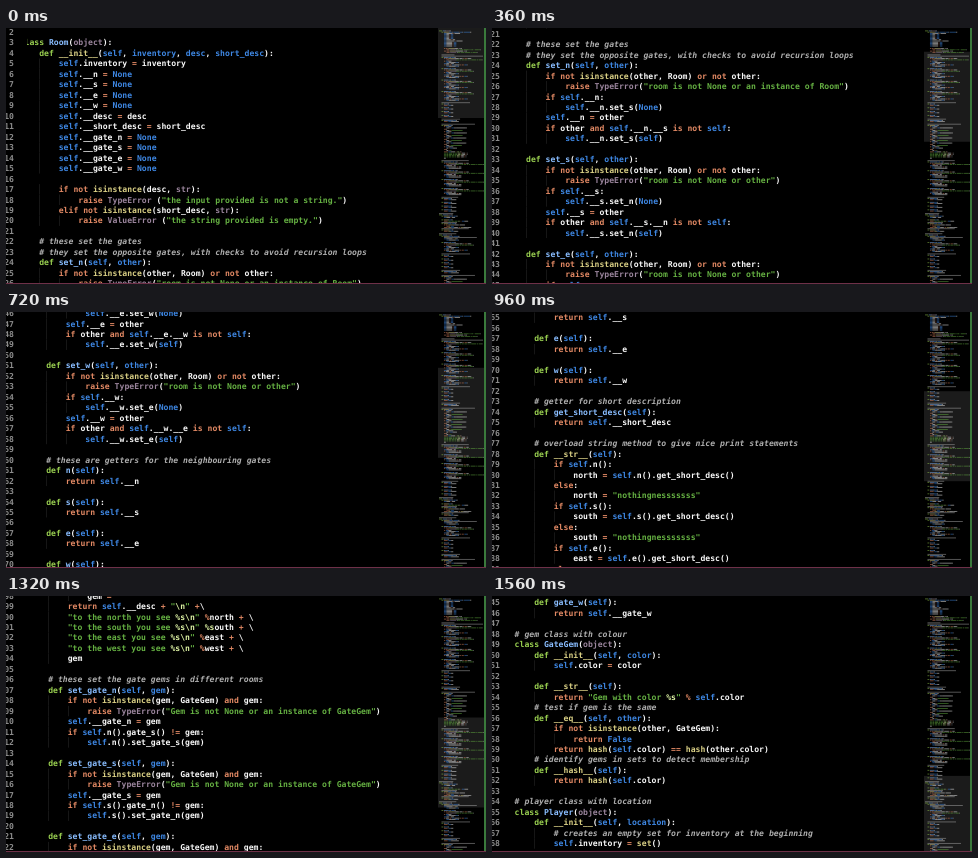
An HTML page with a canvas that plays this animation: 480x256 px, repeating every 1.68 s.

```html
<!DOCTYPE html>
<html>
<head>
<meta charset="utf-8">
<style>
  html, body { margin: 0; width: 100%; height: 100%; overflow: hidden; background: #000; }
  canvas { display: block; }
</style>
</head>
<body>
<canvas id="stage" width="480" height="256"></canvas>
<script>
const ctx = document.getElementById('stage').getContext('2d');
const STEP = 120, ROW = 10.47, COL = 4.89, GUTTER = 21;
const MAP_X = 432, MAP_ROW = 1.26, MAP_COL = 0.62, MAP_VIEW = 90;
const FACE = 'bold 8.12px "DejaVu Sans Mono", monospace';

// First visible line and left edge of the code, one entry per step.
const scroll = [1.56, 5.4, 11.27, 20.4, 30.04, 38.1, 45.84, 54.7, 64.42, 74.6, 85.6, 97.98, 119, 144.33];
const left = [13.6, 13.6, 13.6, 14.5, 15.6, 18, 20.6, 21.6, 22.6, 22.6, 22.6, 22.6, 22.6, 22.6];

const opposite = { n: 's', s: 'n', e: 'w', w: 'e' };
const names = { n: 'north', s: 'south', e: 'east', w: 'west' };
const each = make => Object.keys(opposite).map(d => make(d, opposite[d])).join('\n');

const setter = (d, o) => `    def set_${d}(self, other):
        if not isinstance(other, Room) or not other:
            raise TypeError("room is not None or ${d === 'n' ? 'an instance of Room' : 'other'}")
        if self.__${d}:
            self.__${d}.set_${o}(None)
        self.__${d} = other
        if other and self.__${d}.__${o} is not self:
            self.__${d}.set_${o}(self)
`;
const getter = prefix => d => `    def ${prefix}${d}(self):
        return self.__${prefix}${d}
`;
const describe = d => `        if self.${d}():
            ${names[d]} = self.${d}().get_short_desc()
        else:
            ${names[d]} = "nothingnesssssss"`;
const gemSetter = (d, o) => `    def set_gate_${d}(self, gem):
        if not isinstance(gem, GateGem) and gem:
            raise TypeError("Gem is not None or an instance of GateGem")
        self.__gate_${d} = gem
        if self.${d}().gate_${o}() != gem:
            self.${d}().set_gate_${o}(gem)
`;

const source = String.raw`

class Room(object):
    def __init__(self, inventory, desc, short_desc):
        self.inventory = inventory
${each(d => `        self.__${d} = None`)}
        self.__desc = desc
        self.__short_desc = short_desc
${each(d => `        self.__gate_${d} = None`)}

        if not isinstance(desc, str):
            raise TypeError ("the input provided is not a string.")
        elif not isinstance(short_desc, str):
            raise ValueError ("the string provided is empty.")

    # these set the gates
    # they set the opposite gates, with checks to avoid recursion loops
${each(setter)}
    # these are getters for the neighbouring gates
${each(getter(''))}
    # getter for short description
    def get_short_desc(self):
        return self.__short_desc

    # overload string method to give nice print statements
    def __str__(self):
${each(describe)}
        if self.gems():
            gem = self.gems()
        else:
            gem = ""
        return self.__desc + "\n" +\
${each(d => String.raw`        "to the ${names[d]} you see %s\n" %${names[d]} + ` + '\\')}
        gem

    # these set the gate gems in different rooms
${each(gemSetter)}
    # getters for the gate gems
${each(getter('gate_'))}
# gem class with colour
class GateGem(object):
    def __init__(self, color):
        self.color = color

    def __str__(self):
        return "Gem with color %s" % self.color
    # test if gem is the same
    def __eq__(self, other):
        if not isinstance(other, GateGem):
            return False
        return hash(self.color) == hash(other.color)
    # identify gems in sets to detect membership
    def __hash__(self):
        return hash(self.color)

# player class with location
class Player(object):
    def __init__(self, location):
        # creates an empty set for inventory at the beginning
        self.inventory = set()`;

const C = {
  text: '#f8f8f8', comment: '#aeaeae', string: '#65b042', escape: '#ddf2a4',
  keyword: '#e28964', storage: '#99cf50', variable: '#3e87e3', name: '#89bdff',
  builtin: '#dad085', type: '#9b859d', number: '#8c8c8c', guide: '#161616'
};
const rules = [
  [/^#/, C.comment],
  [/^(%s|\\n)$/, C.escape],
  [/^(if|elif|else|not|or|and|is|return|raise|[=!+%]=?)$/, C.keyword],
  [/^(def|class)$/, C.storage],
  [/^(self|None|False)$/, C.variable],
  [/^(isinstance|hash|set|__(init|str|eq|hash)__)$/, C.builtin],
  [/^(str|object|TypeError|ValueError)$/, C.type]
];

function tokenize(line) {
  const tokens = [];
  const isDef = /^\s*def /.test(line);
  let inString = false;
  for (const m of line.matchAll(/#.*|"|%s|\\n|\w+|[=!+%]=?|[^\s\w]|\s+/g)) {
    const text = m[0], before = line.slice(0, m.index);
    const rule = rules.find(([pattern]) => pattern.test(text));
    let color = rule ? rule[1] : C.text;
    if (text === '"') {
      inString = !inString;
      color = C.string;
    } else if (inString) {
      if (color !== C.escape) color = C.string;
    } else if (!rule && /\w/.test(text)) {
      if (/(def|class) $/.test(before)) color = C.name;
      else if (isDef) color = C.variable;
    }
    if (text.trim()) tokens.push({ text, color, col: m.index });
  }
  return tokens;
}
const lines = source.split('\n').map(tokenize);

function drawText(text, x, y) {
  [...text].forEach((ch, i) => ctx.fillText(ch, x + i * COL, y));
}

function eachVisible(first, draw) {
  for (let n = Math.max(1, Math.floor(first)); n < first + 26; n++) {
    draw(n, (n - first) * ROW + 2.4);
  }
}

function drawNumbers(first) {
  ctx.font = FACE;
  ctx.fillStyle = C.number;
  eachVisible(first, (n, y) => {
    const label = String(n).slice(-2);
    drawText(label, 8 - label.length * COL, y);
  });
}

function drawCode(first, x0) {
  ctx.save();
  ctx.beginPath();
  ctx.rect(GUTTER, 0, MAP_X - GUTTER, 256);
  ctx.clip();
  eachVisible(first, (n, y) => {
    const tokens = lines[n - 1] || [];
    const indent = tokens.length ? tokens[0].col : 0;
    ctx.fillStyle = C.guide;
    for (let col = 4; col < indent; col += 4) ctx.fillRect(Math.round(x0 + col * COL), y - 8, 1, ROW);
    for (const { text, color, col } of tokens) {
      ctx.font = (color === C.comment ? 'italic ' : '') + FACE;
      ctx.fillStyle = color;
      drawText(text, x0 + col * COL, y);
    }
  });
  ctx.restore();
}

function drawMap(first) {
  ctx.fillStyle = '#1b1b1b';
  ctx.fillRect(MAP_X, (first - 1.56) * MAP_ROW, 46, MAP_VIEW);
  ctx.globalAlpha = 0.6;
  for (let n = 0; n < 204; n++) {
    // Code below the last line resembles the earlier methods.
    const tokens = lines[n < lines.length ? n : n - 120];
    for (const { text, color, col } of tokens) {
      ctx.fillStyle = color;
      ctx.fillRect(MAP_X + 1 + col * MAP_COL, n * MAP_ROW, text.length * MAP_COL, 0.8);
    }
  }
  ctx.globalAlpha = 1;
}

function frame() {
  const step = Math.floor((performance.now() - origin) / STEP) % scroll.length;
  ctx.fillStyle = '#000';
  ctx.fillRect(0, 0, 480, 256);
  drawNumbers(scroll[step]);
  drawCode(scroll[step], left[step]);
  drawMap(scroll[step]);
  ctx.fillStyle = '#3a7a3c';
  ctx.fillRect(478, 0, 2, 256);
  ctx.fillStyle = '#6e3048';
  ctx.fillRect(0, 255, 480, 1);
  requestAnimationFrame(frame);
}

ctx.textRendering = 'geometricPrecision';
const origin = performance.now();
frame();
</script>
</body>
</html>
```
